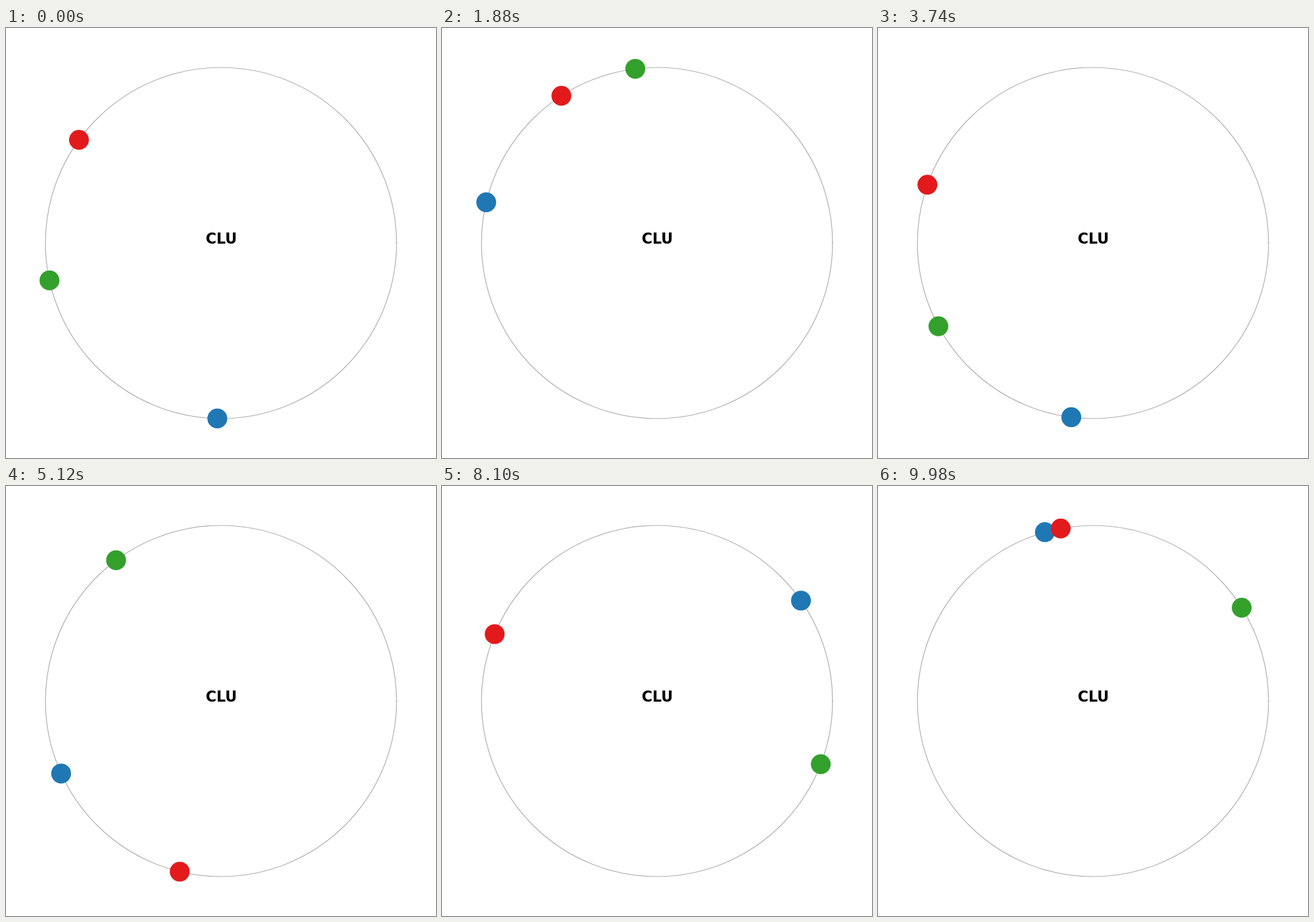
An HTML page for the animation above (10000 ms loop, 654 by 654 pixels).

```html
<!DOCTYPE html>
<html lang="en">
<head>
<meta charset="utf-8">
<title>Dots on a ring</title>
<style>
  html, body { margin: 0; width: 100%; height: 100%; overflow: hidden; background: #fff; }
  svg { display: block; width: 100vw; height: 100vh; }
  text { font: bold 22.2px "DejaVu Sans", sans-serif; text-anchor: middle; }
</style>
</head>
<body>
<svg viewBox="0 0 654 654">
  <circle cx="327" cy="327" r="267" fill="none" stroke="#b0b0b0" stroke-width="1.2"/>
  <rect x="593.5" y="326.5" width="1" height="1" fill="#808080"/>
  <text x="327.5" y="328">CLU</text>
  <g id="dots"></g>
</svg>
<script>
const LOOP = 10000, STEP = 20, START = 460;
const CENTER = 327, RADIUS = 267, DOT = 15.1;

// Key points as [ms, degrees]; the dots rest until START.
const lead = [
  [START, 268.8], [1450, 166], [1880, 166.6], [3740, 262.9], [5120, 204.4], [5560, 161.5],
  [6420, 142.9], [7600, 93], [8100, 34.9], [8600, 18], [9600, 64], [9980, 105.9]];
const gap = [
  [START, 76.5], [1880, 69.5], [3740, 54.6], [5120, 77.7],
  [6420, 62], [8100, 56], [9980, 73.8]];
const loner = [
  [START, 144], [1880, 123], [3740, 160.6], [5120, 256.4], [5560, 271],
  [6420, 266.8], [7600, 170.7], [8100, 157.6], [9000, 176], [9980, 100.6]];

function slope(path, i) {
  const a = path[Math.max(i - 1, 0)];
  const b = path[Math.min(i + 1, path.length - 1)];
  return (b[1] - a[1]) / (b[0] - a[0]);
}

// Cubic Hermite curve through the key points.
function valueAt(path, t) {
  let i = 0;
  while (i < path.length - 2 && t > path[i + 1][0]) i++;
  const [t0, a] = path[i], [t1, b] = path[i + 1];
  const span = t1 - t0, u = Math.min(Math.max((t - t0) / span, 0), 1), v = 1 - u;
  return a * v * v * (1 + 2 * u) + b * u * u * (3 - 2 * u)
    + span * u * v * (v * slope(path, i) - u * slope(path, i + 1));
}

// Green trails blue by a slowly changing gap; red moves on its own.
const movers = [
  { color: "#1f78b4", angle: t => valueAt(lead, t) },
  { color: "#33a02c", angle: t => valueAt(lead, t) - valueAt(gap, t) },
  { color: "#e31a1c", angle: t => valueAt(loner, t) }
];

const layer = document.getElementById("dots");
for (const m of movers) {
  m.dot = document.createElementNS(layer.namespaceURI, "circle");
  m.dot.setAttribute("r", DOT);
  m.dot.setAttribute("fill", m.color);
  layer.append(m.dot);
}

function draw(ms) {
  const t = Math.floor((ms % LOOP) / STEP) * STEP;
  for (const m of movers) {
    const a = m.angle(t) * Math.PI / 180;
    m.dot.setAttribute("cx", CENTER + RADIUS * Math.cos(a));
    m.dot.setAttribute("cy", CENTER - RADIUS * Math.sin(a));
  }
}

let origin;
function tick(now) {
  origin ??= now;
  draw(Math.max(now - origin, 0));
  requestAnimationFrame(tick);
}
draw(0);
requestAnimationFrame(tick);
</script>
</body>
</html>
```
